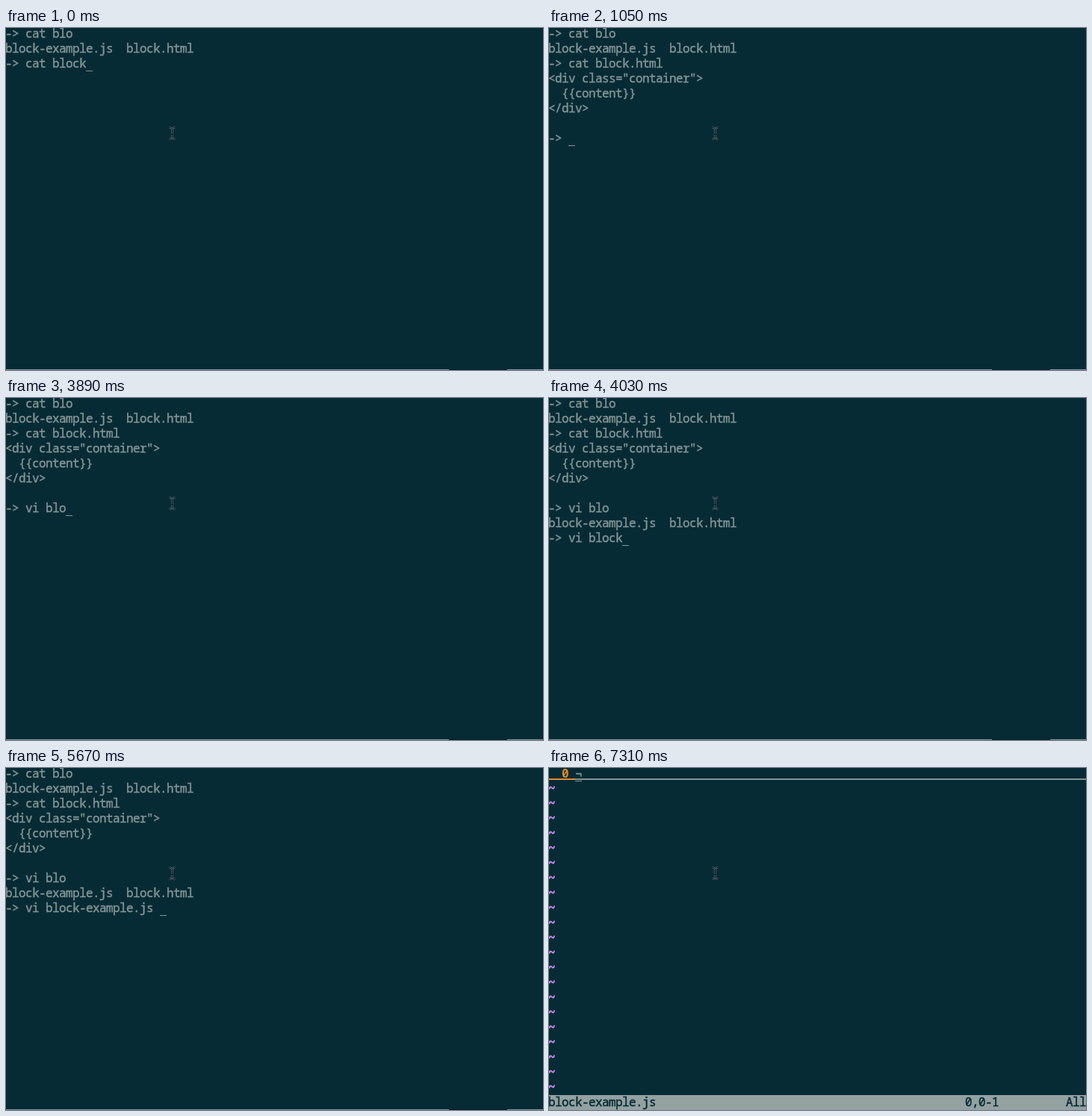
Write an HTML page that moves like this. It is 719 px wide and 458 px high and loops after 8000 ms.

```html
<!DOCTYPE html>
<html lang="en">
<meta charset="utf-8">
<title>Terminal</title>
<style>
  html, body { margin: 0; width: 100%; height: 100%; overflow: hidden; background: #072b34; }
  #stage { position: relative; width: 719px; height: 458px; overflow: hidden; }
  #stage * { position: absolute; }
  pre {
    margin: 0; left: -1px; top: -3px; color: #839496;
    font: 16px/20px "Noto Sans Mono", monospace; letter-spacing: -.6px;
    font-variant-ligatures: none; -webkit-text-stroke: .45px;
  }
  #stage pre * { position: static; }
  #cursor, #stray { height: 1px; background: #839496; }
  #edge { left: 0; top: 457px; width: 719px; height: 1px; background: #869699; }
  #edge i { left: 593px; width: 78px; height: 1px; background: #041c22; }
  .line { top: 14px; height: 2px; background: #839496; }
  .bar { top: 438px; width: 719px; height: 20px; background: #93a1a1; }
  .num { color: #e08a2c; font-weight: 700; -webkit-text-stroke: 0; }
  .tilde { color: #c58cf0; -webkit-text-stroke: .8px; }
  .status { color: #072b34; }
  svg { left: 216px; top: 131px; fill: none; }
</style>
<div id="stage">
  <div id="edge"><i></i></div>
  <div id="shell">
    <pre id="text"></pre>
    <div id="stray"></div>
  </div>
  <div id="editor">
    <div class="line" style="left:0;width:35px;background:#e08a2c"></div>
    <div class="line" style="left:35px;width:684px"></div>
    <div class="bar"></div>
    <pre id="buffer"></pre>
  </div>
  <div id="cursor"></div>
  <svg width="13" height="20">
    <defs><path id="beam" d="M2.5 2.5H4.5L6.5 4.5L8.5 2.5H10.5M6.5 4V16M2.5 17.5H4.5L6.5 15.5L8.5 17.5H10.5M5 11.5H8"/></defs>
    <use href="#beam" stroke="#64777b" stroke-width="2.2"/>
    <use href="#beam" stroke="#0a1216"/>
  </svg>
</div>
<script>
  const $ = id => document.getElementById(id);
  const LOOP = 8000, EDIT = 7310, CELL = 9, ROW = 20;

  const files = "block-example.js  block.html\n";
  const first = "-> cat blo\n" + files + "-> cat block";
  const output = first + '.html\n<div class="container">\n  {{content}}\n</div>\n\n-> ';
  const second = output + "vi blo\n" + files + "-> vi block";

  // [time, screen text]; the cursor follows the last character
  const steps = [
    [0, first], [150, first + "."], [450, first + ".h"], [600, first + ".html "],
    [1050, output], [2850, output + "vi"], [3000, output + "vi "],
    [3590, output + "vi b"], [3740, output + "vi bl"], [3890, output + "vi blo"],
    [4030, second], [5080, second + "-"], [5220, second + "-e"],
    [5370, second + "-ex"], [5520, second + "-example.js "]
  ];

  // bits of the old cursor left behind: [from, to, x, y, width]
  const strays = [[150, 300, 107, 57, 2], [5080, 5670, 98, 197, 1]];

  const span = (name, text) => `<span class="${name}">${text}</span>`;
  const status = "block-example.js".padEnd(62) + "0,0-1".padEnd(15) + "All";
  $("buffer").innerHTML = span("num", "  0 ") + "¬\n" +
    span("tilde", "~\n".repeat(21)) + span("status", status);

  function place(el, x, y, width) {
    el.style.left = x + "px";
    el.style.top = y + "px";
    el.style.width = width + "px";
  }

  function draw(now) {
    const t = now % LOOP, editing = t >= EDIT;
    const text = steps.findLast(s => s[0] <= t)[1];
    const lines = text.split("\n");
    const col = editing ? 4 : lines.at(-1).length;
    const row = editing ? 0 : lines.length - 1;

    if ($("text").textContent !== text) $("text").textContent = text;
    $("shell").hidden = editing;
    $("editor").hidden = !editing;
    $("cursor").hidden = t >= 7170 && !editing;
    place($("cursor"), col * CELL - 1, row * ROW + 17, CELL);

    const stray = strays.find(s => t >= s[0] && t < s[1]);
    $("stray").hidden = !stray;
    if (stray) place($("stray"), ...stray.slice(2));
  }

  function tick(now) {
    draw(now);
    requestAnimationFrame(tick);
  }
  draw(0);
  requestAnimationFrame(tick);
</script>
</html>
```
